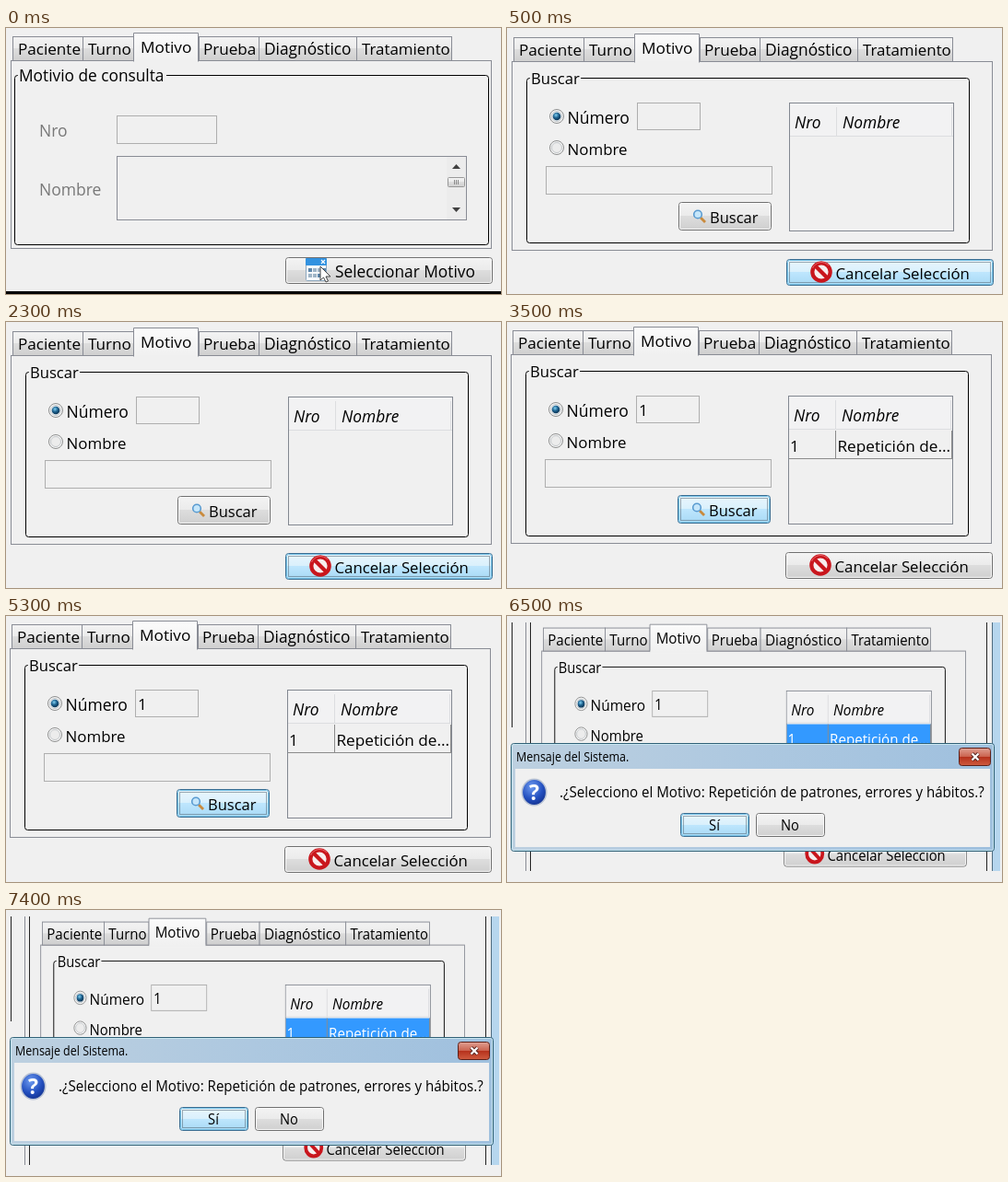
An HTML page that plays this animation: 537 by 289 pixels, repeating every 8000 ms.

```html
<!DOCTYPE html>
<html lang="es">
<head>
<meta charset="utf-8">
<title>Motivo de consulta</title>
<style>
html, body { margin: 0; width: 100%; height: 100%; overflow: hidden; background: #f0f0f0; }
svg { display: block; width: 537px; height: 289px; }
text { font-family: "Open Sans", "Noto Sans", sans-serif; white-space: pre; }
</style>
</head>
<body>
<svg id="stage" viewBox="0 0 537 289" xmlns="http://www.w3.org/2000/svg">
  <defs>
    <linearGradient id="plain" x2="0" y2="1">
      <stop stop-color="#f3f3f3"/><stop offset=".49" stop-color="#ebebeb"/>
      <stop offset=".5" stop-color="#dddddd"/><stop offset="1" stop-color="#cfcfcf"/>
    </linearGradient>
    <linearGradient id="hot" x2="0" y2="1">
      <stop stop-color="#eaf6fd"/><stop offset=".49" stop-color="#d9f0fc"/>
      <stop offset=".5" stop-color="#bee6fd"/><stop offset="1" stop-color="#a7d9f5"/>
    </linearGradient>
    <linearGradient id="front" x2="0" y2="1">
      <stop stop-color="#fbfbfb"/><stop offset="1" stop-color="#f0f0f0"/>
    </linearGradient>
    <linearGradient id="bar">
      <stop stop-color="#bdd0e0"/><stop offset=".5" stop-color="#adc8e0"/><stop offset="1" stop-color="#9fc0de"/>
    </linearGradient>
    <linearGradient id="red" x2="0" y2="1">
      <stop stop-color="#e0a093"/><stop offset=".48" stop-color="#cb6450"/>
      <stop offset=".5" stop-color="#b5301b"/><stop offset="1" stop-color="#cf5c40"/>
    </linearGradient>
    <radialGradient id="ball" cx=".4" cy=".3" r=".75">
      <stop stop-color="#6f9cf0"/><stop offset=".6" stop-color="#2450c0"/><stop offset="1" stop-color="#12308c"/>
    </radialGradient>
    <radialGradient id="dot" cx=".4" cy=".35" r=".7">
      <stop stop-color="#7fd0f2"/><stop offset=".5" stop-color="#1c5f8c"/><stop offset="1" stop-color="#0b2f4c"/>
    </radialGradient>
  </defs>
  <g id="detail"></g>
  <g id="search"></g>
  <g id="dialog"></g>
</svg>
<script>
const $ = id => document.getElementById(id);

const text = (x, y, s, size = 17.2, fill = '#000', extra = '') =>
  `<text x="${x}" y="${y}" font-size="${size}" fill="${fill}" ${extra}>${s}</text>`;

// Edges are given as pixel columns and rows, so strokes sit on half pixels.
const box = (x1, y1, x2, y2, stroke, fill = 'none', r = 0, extra = '') =>
  `<rect x="${x1 + .5}" y="${y1 + .5}" width="${x2 - x1}" height="${y2 - y1}" rx="${r}" fill="${fill}" stroke="${stroke}" ${extra}/>`;

const path = (d, stroke, width = 1, fill = 'none') =>
  `<path d="${d}" stroke="${stroke}" stroke-width="${width}" fill="${fill}"/>`;

const button = (x1, y1, x2, y2, hot) =>
  box(x1, y1, x2, y2, hot ? '#3a6d92' : '#707070', `url(#${hot ? 'hot' : 'plain'})`, 3) +
  box(x1 + 1, y1 + 1, x2 - 1, y2 - 1, hot ? '#7cc4e6' : '#f8f8f8', 'none', 2) +
  (hot ? box(x1 + 3, y1 + 3, x2 - 3, y2 - 3, '#4a5a66', 'none', 0, 'stroke-dasharray="1 1"') : '');

const field = (x1, y1, x2, y2) => box(x1, y1, x2, y2, '#aeaeae', '#f0f0f0');

function tabs(bottom) {
  const list = [
    [7, 83, 'Paciente', 17.1, 13], [83, 138, 'Turno', 17.1, 89], [209, 274, 'Prueba', 17.1, 214],
    [274, 380, 'Diagnóstico', 17.3, 280], [380, 483, 'Tratamiento', 16.9, 386]
  ];
  return box(5, 35, 526, bottom, '#898c95', '#f0f0f0') +
    list.map(([a, b, s, size, x]) =>
      box(a, 9, b, 35, '#898c95', 'url(#plain)') + text(x, 29, s, size)).join('') +
    path('M138.5 36.5V5.5H208.5V36.5', '#898c95', 1, 'url(#front)') +
    '<rect x="139" y="35" width="69" height="3" fill="#f0f0f0"/>' +
    text(146, 27, 'Motivo', 17.2);
}

function frame(x1, y1, x2, y2, s, size, x, end, base) {
  return box(x1, y1, x2, y2, '#000', 'none', 3) +
    `<rect x="${x - 2}" y="${y1 - 2}" width="${end - x + 4}" height="5" fill="#f0f0f0"/>` +
    text(x - 1, base, s, size);
}

const radio = (x, y, on) =>
  `<circle cx="${x}" cy="${y}" r="7.5" fill="#f6f6f6" stroke="#8e8f8f"/>` +
  `<circle cx="${x}" cy="${y}" r="5.5" fill="${on ? '#e6eef3' : '#ececec'}" stroke="#c4c8cb"/>` +
  (on ? `<circle cx="${x}" cy="${y}" r="4.3" fill="url(#dot)"/>` : '');

const ban =
  '<circle cx="341" cy="265" r="9.7" fill="#f7eeee" stroke="#c9161d" stroke-width="4.2"/>' +
  path('M334 258L348 272', '#c9161d', 4.2) +
  path('M331.5 261A10.5 10.5 0 0 1 349 258', '#e8656a', 1);

const lens =
  path('M210 206L215 211', '#c98a3c', 2.8) +
  '<circle cx="207" cy="202.5" r="4.3" fill="#c5e6fa" stroke="#5a9bd0" stroke-width="1.6"/>';

function pickIcon() {
  let cells = '';
  for (let i = 0; i < 8; i++) {
    const x = 328 + i % 4 * 5, y = 261 + (i >> 2) * 6;
    cells += `<rect x="${x}" y="${y}" width="4" height="4" fill="${i % 3 ? '#9fb4c6' : '#5d86aa'}"/>`;
  }
  return box(325, 250, 347, 274, '#8fa9bf', '#f5f8fb', 1) +
    '<rect x="325" y="250" width="23" height="8" rx="1" fill="#3292e0"/>' +
    path('M342 252L346 256M346 252L342 256', '#fff', 1.2) + cells +
    path('M341 259V274L344.5 271L347 276L349.5 275L347 270H352Z', '#444', 1, '#fff');
}

function detail() {
  return tabs(239) +
    frame(9, 51, 523, 235, 'Motivio de consulta', 17.3, 15, 172, 58) +
    text(36, 118, 'Nro', 17.5, '#787878') + text(36, 182, 'Nombre', 17.5, '#787878') +
    field(120, 95, 228, 125) +
    box(120, 139, 499, 208, '#898c95', '#f0f0f0') +
    '<rect x="478" y="140" width="21" height="68" fill="#ececec"/>' +
    path('M484 153L488.5 148L493 153Z', 'none', 0, '#404040') +
    path('M484 195L488.5 200L493 195Z', 'none', 0, '#404040') +
    box(479, 162, 497, 172, '#989898', 'url(#plain)', 1) +
    path('M486.5 165V170M488.5 165V170M490.5 165V170', '#8a8a8a') +
    button(303, 249, 527, 277, false) + pickIcon() +
    text(357, 271, 'Seleccionar Motivo', 17.3) +
    '<rect y="286" width="537" height="3" fill="#000"/>';
}

function table(filled, picked) {
  const ink = picked ? '#fff' : '#000';
  const row = filled
    ? `<rect x="307" y="119" width="177" height="31" fill="${picked ? '#3399ff' : '#f0f0f0'}"/>` +
      path('M307 149.5H484.5M357.5 119V150M483.5 119V150', '#8b8b8b') +
      text(308, 142, '1', 17.2, ink) + text(359.5, 142, 'Repetición de...', 17.2, ink)
    : '';
  return box(306, 81, 484, 220, '#828790', '#f0f0f0') +
    '<rect x="307" y="82" width="177" height="36" fill="#f2f2f3"/>' +
    path('M307 117.5H484M357.5 86V118M482.5 86V118', '#dcdde0') +
    text(312, 109, 'Nro', 17.4, '#000', 'font-style="italic"') +
    text(364, 109, 'Nombre', 17.4, '#000', 'font-style="italic"') + row;
}

function search(found, picked) {
  return `<g transform="translate(0 1)">${tabs(240)}</g>` +
    frame(21, 54, 501, 233, 'Buscar', 16.6, 27, 78, 61) +
    radio(54, 96, true) + text(65.5, 104, 'Número', 17.5) +
    radio(54, 130, false) + text(65.5, 138, 'Nombre', 16.9) +
    field(141, 81, 209, 110) + (found ? text(144, 103, '1', 17.2) : '') +
    field(42, 150, 287, 180) +
    button(186, 189, 286, 219, found) + lens + text(220, 212, 'Buscar', 16.5) +
    table(found, picked) +
    button(303, 251, 527, 279, !found) + ban + text(356.5, 273, 'Cancelar Selección', 16.8);
}

// Parent window edges that lie beside the squeezed form.
const edges =
  path('M5.5 7V121M25.5 7V277M520.5 7V277', '#222') + path('M20.5 7V277', '#898c95') +
  '<rect x="527" y="7" width="8" height="270" fill="#b6d6ee"/>' + path('M526.5 7V277', '#4f6c80');

// The last view is narrower than tall by this ratio, lettering included.
const NARROW = .917;
const slim = (x, y, s, size, extra) =>
  `<g transform="translate(${x} ${y}) scale(${NARROW} 1)">${text(0, 0, s, size, '#000', extra)}</g>`;

function dialog() {
  const cross = 'M504.5 149.5L511.5 156.5M511.5 149.5L504.5 156.5';
  const middle = 'text-anchor="middle"';
  return box(4, 138, 528, 255, '#2f6076', 'url(#bar)', 3) +
    box(5, 139, 527, 254, '#c9e6f0', 'none', 2) +
    '<rect x="9" y="166" width="515" height="85" fill="#f0f0f0"/>' +
    slim(10, 158, 'Mensaje del Sistema.', 13.6) +
    box(490, 143, 524, 162, '#5c2019', 'url(#red)', 3) +
    path(cross, '#5a2a24', 4.2) + path(cross, '#fff', 2.2) +
    '<ellipse cx="29.5" cy="191.5" rx="13.2" ry="14.2" fill="url(#ball)" stroke="#b9c3d4" stroke-width="1.6"/>' +
    text(29.5, 200, '?', 23, '#fff', middle + ' font-weight="700"') +
    slim(57, 197, '.¿Selecciono el Motivo: Repetición de patrones, errores y hábitos.?', 16.45) +
    button(188, 214, 262, 239, true) + button(270, 214, 344, 239, false) +
    slim(225, 233, 'Sí', 16, middle) + slim(307, 233, 'No', 16, middle);
}

const LOOP = 8000;
const STARTS = [0, 500, 3500, 6500];
const squeeze = 'matrix(.8825 0 0 .963 33.7 3.9) translate(-1 -1)';
const views = [
  { detail: detail() },
  { search: search(false, false) },
  { search: `<g transform="translate(-1 -1)">${search(true, false)}</g>` },
  { search: `${edges}<g transform="${squeeze}">${search(true, true)}</g>`, dialog: dialog() }
];

let shown = -1;
function draw(now) {
  const t = now % LOOP;
  const step = STARTS.filter(s => s <= t).length - 1;
  if (step !== shown) {
    shown = step;
    for (const id of ['detail', 'search', 'dialog']) $(id).innerHTML = views[step][id] || '';
  }
}

const begin = performance.now();
function tick() {
  draw(performance.now() - begin);
  requestAnimationFrame(tick);
}
tick();
</script>
</body>
</html>
```
